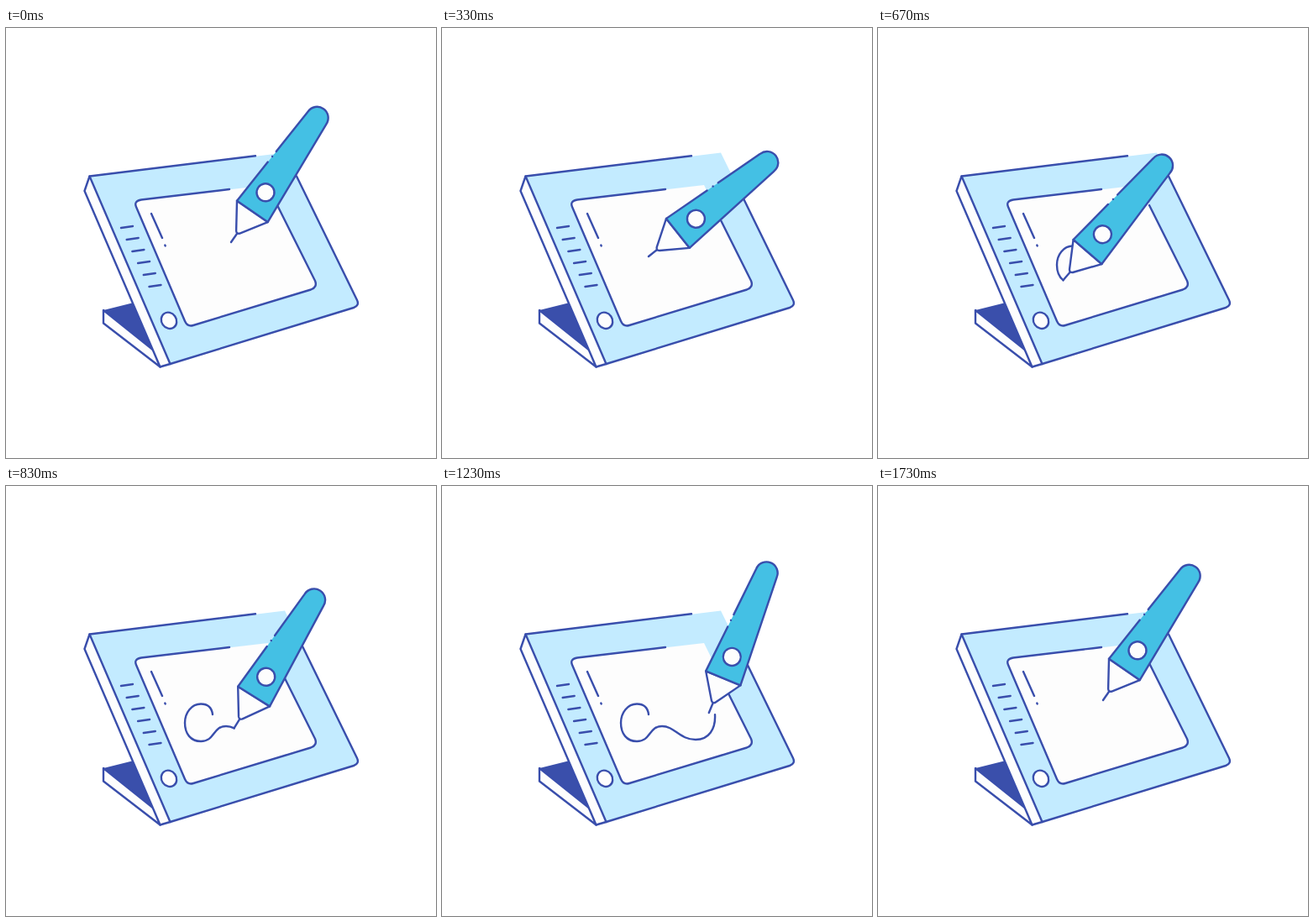
An HTML page for the animation above (2000 ms loop, 512 by 512 pixels).

```html
<!DOCTYPE html>
<html lang="en">
<head>
<meta charset="utf-8">
<title>Drawing tablet</title>
<style>
  html, body { margin: 0; width: 100%; height: 100%; overflow: hidden; background: #fff; }
  svg { display: block; width: 100vw; height: 100vh; }
  .line { fill: none; }
  .paper { fill: #fdfdfd; }
  .light { fill: #c3ebff; }
  .dark { fill: #3a4fab; }
  .pen { fill: #44c0e4; }
  .bare { stroke: none; }
</style>
</head>
<body>
<svg viewBox="0 0 512 512" stroke="#394eac" stroke-width="2.4" stroke-linecap="round" stroke-linejoin="round">
  <!-- stand -->
  <path class="dark bare" d="M116 336 L152 327 L178 386 Z"/>
  <path class="paper" d="M116 336 L116 351.500 L183.500 403.500 L176 384 Z"/>

  <!-- tablet body -->
  <path class="light bare" d="M99.500 176.500 L332 148.500 L418 324 Q421 330 415 332.500 L195.500 400 Z"/>
  <path class="paper" d="M99.500 176.500 L93.500 194 L183.500 403.500 L195.500 400 Z"/>
  <path class="line" d="M297 152.300 L99.500 176.500 M195.500 400 L414 333 Q421 330.500 418 324 L346 176.500"/>

  <!-- screen -->
  <path class="paper bare" d="M312 187 L161 204.500 Q152 206 155 213 L213 349 Q216 356 223 354 L363 311.500 Q371 308.500 368 301 Z"/>
  <path class="line" d="M266 192 L161 204.500 Q152 206 155 213 L213 349 Q216 356 223 354 L363 311.500 Q371 308.500 368 301 L323 211"/>
  <path class="line" d="M173 221 L186 250 M189.300 258.500 l.4 .9"/>

  <!-- controls -->
  <path id="ticks" class="line"/>
  <ellipse class="paper" cx="194" cy="348.300" rx="8.800" ry="10" transform="rotate(-35 194 348.300)"/>

  <path id="stroke" class="line" pathLength="1" d="M246 272 C245 264 240 259.500 232 259.500 C221 259.500 213 270 213 282 C213 295 220 304 232 304 C249 304 246 286 262 286 C277 286 283 302 302 302 C318 302 326 289 325 272"/>

  <!-- pen, with its tip at the origin -->
  <g id="pen">
    <path class="line" d="M0 0 V-12.500"/>
    <path class="paper" d="M-22.300 -44.500 L-2.600 -14.500 Q0 -11.500 2.600 -14.500 L22.300 -44.500 Z"/>
    <path class="pen" stroke-dasharray="59 8.500 .1 7.400 600" d="M-22.300 -44.500 L-13.200 -180 A13.200 13.200 0 0 1 13.200 -180 L22.300 -44.500 Z"/>
    <circle class="paper" cy="-72" r="10.500"/>
  </g>
</svg>
<script>
  const LOOP = 2000, FPS = 30, LAST = 52;
  const DRAW = 10, LIFT = 35, DRAWN = 38, REST = 44, CLEAR = 51;
  const HOME = { x: 268, y: 255, angle: 34.7 };
  const START_ANGLE = 51.6, END_ANGLE = 20.6;

  const pen = document.getElementById('pen');
  const stroke = document.getElementById('stroke');
  const length = stroke.getTotalLength();

  document.getElementById('ticks').setAttribute('d',
    Array.from({ length: 6 }, (_, i) => `M${137 + i * 6.7} ${238 + i * 14} l14 -2`).join(' '));

  const ratio = (f, from, to) => Math.min(1, Math.max(0, (f - from) / (to - from)));
  const smooth = x => x * x * (3 - 2 * x);
  // quick start, long soft finish
  const drawEase = x => 1 - (1 - x ** 1.8) ** 2.55;
  const mix = (a, b, k) => a + (b - a) * k;

  function poseOnStroke(p) {
    const { x, y } = stroke.getPointAtLength(p * length);
    return { x, y, angle: mix(START_ANGLE, END_ANGLE, p) };
  }

  function blend(a, b, k) {
    return { x: mix(a.x, b.x, k), y: mix(a.y, b.y, k), angle: mix(a.angle, b.angle, k) };
  }

  function render(ms) {
    // the motion advances in steps of 1/30 s, then rests until the loop ends
    const f = Math.min(LAST, Math.floor((ms % LOOP + 5) * FPS / 1000));
    const p = drawEase(ratio(f, DRAW, DRAWN));

    let pose = poseOnStroke(p);
    if (f < DRAW) pose = blend(HOME, pose, smooth(ratio(f, 0, DRAW)));
    if (f > LIFT) pose = blend(pose, HOME, smooth(ratio(f, LIFT, REST)));
    pen.setAttribute('transform', `translate(${pose.x} ${pose.y}) rotate(${pose.angle})`);

    stroke.setAttribute('stroke-dasharray', `${p} 2`);
    stroke.setAttribute('opacity', p > 0 ? 1 - ratio(f, REST, CLEAR) : 0);
  }

  const begin = performance.now();
  function tick() {
    render(performance.now() - begin);
    requestAnimationFrame(tick);
  }
  tick();
</script>
</body>
</html>
```
